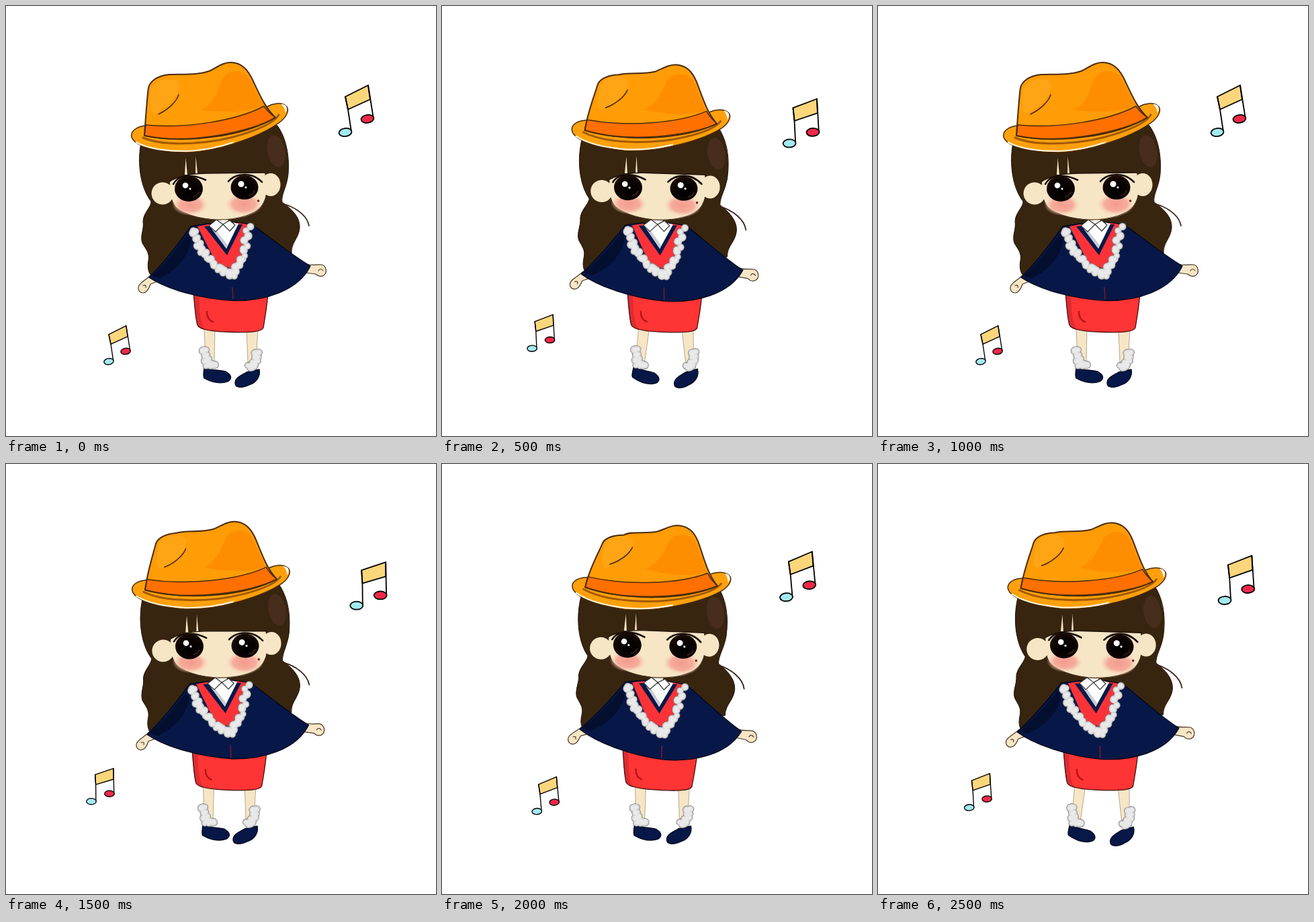
Animation, 640 px wide and 640 px high, one loop 3 s. Source, as an HTML page:

```html
<!DOCTYPE html>
<html lang="en">
<head>
<meta charset="utf-8">
<title>Dancing girl</title>
<style>
  html, body { margin: 0; width: 100%; height: 100%; overflow: hidden; background: #fff; }
  svg { display: block; width: 100vw; height: 100vh; }
</style>
</head>
<body>
<svg viewBox="0 0 640 640" stroke-linecap="round" stroke-linejoin="round">
  <defs>
    <radialGradient id="blush">
      <stop offset="0" stop-color="#f49a8e"/>
      <stop offset=".6" stop-color="#f5a697" stop-opacity=".9"/>
      <stop offset="1" stop-color="#f7d3b5" stop-opacity="0"/>
    </radialGradient>
    <radialGradient id="iris" cx=".55" cy=".6" r=".6">
      <stop offset="0" stop-color="#000"/>
      <stop offset=".65" stop-color="#0a0402"/>
      <stop offset="1" stop-color="#1d0d07"/>
    </radialGradient>
    <g id="note" stroke="#000" stroke-width="1.8">
      <path d="M-16.5-43 17.5-60 20.5-39-12.5-24Z" fill="#fcd67a"/>
      <path d="M-16.5-43-12.5-24-7.5 9M17.5-60 25.5-10" fill="none"/>
      <ellipse cx="-16.5" cy="10" rx="9.5" ry="6" transform="rotate(-8 -16.5 10)" fill="#a3eaf0"/>
      <ellipse cx="16.5" cy="-10" rx="9.5" ry="6" transform="rotate(-8 16.5 -10)" fill="#ee2848"/>
    </g>
  </defs>

  <g id="hair">
    <path fill="#38250f" stroke="#20140a" stroke-width="1" d="M201 203C195 235 200 270 216 291C216 300 204 308 204 321C206 332 199 342 203 353C208 362 214 367 212 379C210 390 212 400 220 404L320 400 425 368C424 352 436 346 437 330C438 314 425 302 411 292C409 281 418 270 420 250C422 225 418 198 404 178L300 160Z"/>
    <ellipse cx="402" cy="216" rx="13" ry="24" transform="rotate(-12 402 216)" fill="#472d1b"/>
    <path d="M411 294C430 299 448 311 451 327" fill="none" stroke="#38221a" stroke-width="1.8"/>
  </g>

  <g id="legL">
    <path d="M295 480 297 530H310L311 480Z" fill="#f6e6c6" stroke="#b9a98b" stroke-width="1"/>
    <path d="M295 538C294 546 293 552 295 554C306 560 319 563 330 559C337 555 336 549 327 544C315 541 305 543 295 538Z" fill="#071848" stroke="#02081c" stroke-width="1.3"/>
    <g id="furL"></g>
  </g>
  <g id="legR">
    <path d="M358 480 360 530H372L375 480Z" fill="#f6e6c6" stroke="#b9a98b" stroke-width="1"/>
    <path d="M377 541C379 550 374 560 362 564C352 569 340 569 341 560C342 552 352 549 358 545Z" fill="#071848" stroke="#02081c" stroke-width="1.3"/>
    <g id="furR"></g>
  </g>

  <g id="skirt">
    <path d="M279 425C281 450 282 465 285 475C288 482 310 485 340 485.500C365 486 380 485 383 479C386 460 389 445 390 425Z" fill="#ff3434"/>
    <path d="M279 425C281 450 282 465 285 475C287 479 291 481 296 482C288 470 288 450 287 425Z" fill="#dc2d31"/>
    <path d="M299 455C299 462 302 468 308 470" fill="none" stroke="#b0181e" stroke-width="2.500"/>
    <path d="M279 425C281 450 282 465 285 475C288 482 310 485 340 485.500C365 486 380 485 383 479C386 460 389 445 390 425" fill="none" stroke="#4a1010" stroke-width="1.3"/>
  </g>

  <g id="body">
    <g fill="#f6e6c6" stroke="#4a3828" stroke-width="1.2">
      <path d="M216 400C209 407 201 411 198 416C195 422 199 427 204 427C210 427 213 420 215 414L230 408Z"/>
      <path d="M447 384C456 387 463 384 470 385C476 387 478 394 475 399C471 404 465 403 461 399L446 397Z"/>
      <path d="M204 416Q209 414 208 419M472 394Q468 389 465 394" fill="none"/>
    </g>
    <path d="M310 312H331L330 324H314Z" fill="#f6e6c6"/>
    <path d="M275 328C258 352 236 381 213 404C240 422 290 436 340 438.500C385 439 435 424 453 387C430 374 395 346 366 325L340 322 300 324Z" fill="#071848" stroke="#02081c" stroke-width="1.4"/>
    <path d="M273 336C257 358 238 382 217 402L229 406C246 396 268 383 275 352Z" fill="#040f30"/>
    <path d="M337 419 338 436" stroke="#7a1c2c" stroke-width="1.5"/>
    <path d="M285 328 300 325 345 323 361 325 354 368 336 391 313 383Z" fill="#fb3338"/>
    <path d="M295 328 329 371 352 325Z" fill="#071848"/>
    <path d="M302 326 328 361 346 324 322 319Z" fill="#fff"/>
    <path d="M303 327 328 361 330 356 315 337Z" fill="#c9ccd4"/>
    <path d="M302 327 313 318 323 325 312 336ZM323 325 333 319 341 326 333 335Z" fill="#fff" stroke="#333" stroke-width="1.2"/>
    <g id="trim"></g>
  </g>

  <g id="face">
    <g fill="#f6e6c6">
      <circle cx="233" cy="279" r="16.500"/>
      <ellipse cx="394" cy="266" rx="14.500" ry="17"/>
      <path d="M244 261C262 250 285 249 300 249L385 248C388 264 389 278 384 291C377 309 355 316 330 317.500C305 319 275 315 257 303C246 294 244 278 244 261Z"/>
      <path d="M266 251 267.500 226 270 251ZM282 250 282.500 224 285 249Z"/>
    </g>
    <path d="M246 290C250 303 275 316 310 318C340 319 378 312 385 289" fill="none" stroke="#4a3322" stroke-width="1.2"/>
    <path d="M244 261C262 250 285 249 300 249L386 248" fill="none" stroke="#1d1108" stroke-width="1.4"/>
    <ellipse cx="274" cy="296" rx="27" ry="16" fill="url(#blush)"/>
    <ellipse cx="354" cy="295" rx="28" ry="17" fill="url(#blush)"/>
    <ellipse cx="272" cy="272" rx="21" ry="19" fill="url(#iris)"/>
    <ellipse cx="355" cy="270" rx="20.500" ry="18" fill="url(#iris)"/>
    <path d="M249 265C254 256 262 253 272 253C283 253 291 256 297 259M331 261C338 253 347 251 356 251C366 251 374 255 381 262" fill="none" stroke="#160c07" stroke-width="2.600"/>
    <g fill="#fff">
      <circle cx="267" cy="267" r="4.300"/><circle cx="274" cy="272" r="1.600"/>
      <circle cx="350" cy="265" r="4.500"/><circle cx="357" cy="270" r="1.600"/>
    </g>
    <path d="M279 284Q285 282 287 277M362 282Q368 280 370 275" fill="none" stroke="#3a1f14" stroke-width="1.800"/>
    <circle cx="375.500" cy="290" r="1.700" fill="#701522"/>
  </g>

  <g id="hat" stroke="#4a2c0c">
    <path d="M207 178C193 180 185 187 187 195C191 209 226 217 268 218C322 216 385 191 410 171C420 162 422 152 416 148C409 143 397 145 388 150Z" fill="#ffa00c" stroke-width="1.500"/>
    <path d="M194 203C211 212 240 216 268 216C295 215 318 210 338 203" fill="none" stroke="#fff3d6" stroke-width="2.200"/>
    <path d="M409 146C418 146 420 152 416 159C415 153 413 149 409 146Z" fill="#fff" stroke="none"/>
    <path d="M204 196C240 211 310 205 355 190C380 182 400 172 406 162" fill="none" stroke="#a35a06" stroke-width="3"/>
    <path class="crown" fill="#ff9c06" stroke="none"/>
    <path d="M291 155C310 145 316 125 322 108C330 96 350 92 360 105C368 120 376 136 383 148C355 160 320 158 291 155Z" fill="#ff8d00" stroke="none"/>
    <path id="sheen" d="M216 125C222 110 238 106 256 112C262 122 250 145 222 160C214 162 213 145 216 125Z" fill="#ffa515" stroke="none"/>
    <path d="M208 177C270 183 345 170 384 149C388 155 394 161 401 166C355 194 270 206 206 193Z" fill="#ff7000" stroke-width="1.500"/>
    <path class="crown" fill="none" stroke-width="2"/>
    <path id="crease" d="M257 132C254 142 242 154 227 161" fill="none" stroke-width="1.600"/>
  </g>

  <use id="noteBig" href="#note"/>
  <use id="noteSmall" href="#note"/>
</svg>
<script>
const BEAT = 500;
const $ = id => document.getElementById(id);

// Fluffy fur: small overlapping circles scattered along a polyline
function fur(id, points, count, radius) {
  const dots = [];
  for (let i = 0; i < count; i++) {
    const p = i / (count - 1) * (points.length - 1);
    const k = Math.min(Math.floor(p), points.length - 2), f = p - k;
    const [a, b] = [points[k], points[k + 1]];
    const x = a[0] + (b[0] - a[0]) * f + 3 * Math.sin(i * 2.4);
    const y = a[1] + (b[1] - a[1]) * f + 2 * Math.cos(i * 1.9);
    dots.push([x, y, radius * (1 + 0.15 * Math.sin(i * 3.7))]);
  }
  const layer = (grow, fill) => dots.map(([x, y, r]) =>
    `<circle cx="${x}" cy="${y}" r="${r + grow}" fill="${fill}"/>`).join('');
  $(id).innerHTML = layer(0.7, '#77777c') + layer(0, '#d6d6d6') + layer(-1.8, '#e9e9e9');
}
fur('trim', [[279, 333], [290, 362], [312, 388], [337, 401], [352, 376], [361, 330]], 46, 5.2);
fur('furL', [[295, 510], [298, 523], [301, 535], [309, 533]], 17, 5);
fur('furR', [[375, 514], [372, 526], [367, 537], [362, 537]], 17, 5);

// The left side of the crown slides inwards by k
const crown = k => `M206 193C208 165 ${210 + k} 135 ${212 + k} ${122 + 0.3 * k}`
  + `C${214 + k} ${112 + 0.5 * k} ${225 + k} ${104 + 0.6 * k} ${242 + k} ${102 + 0.6 * k}`
  + 'C262 101 285 103 302 97C313 92 322 84 334 84C350 84 360 94 368 112'
  + 'C378 133 386 152 401 166C365 188 270 207 206 193';

const pivots = {
  hat: [303, 172], face: [312.5, 271], hair: [312.5, 271], body: [320, 322],
  skirt: [335, 432], legL: [303, 480], legR: [366, 480]
};

// Each part: turn in degrees, shift x, shift y
const rest = { crown: 0 };
const sway = {
  crown: 7,
  hat: [5, 8, 0.5], face: [2.5, 5, 0], hair: [2.6, 4, 0], body: [2.7, -2, 0],
  skirt: [0.4, -3, 0], legL: [7, -2.5, 0], legR: [-4, -1, 0]
};
const nod = {
  crown: 6,
  hat: [3.2, 2, 0], face: [0.7, 1, 0], hair: [0.7, 1, 0], body: [0.7, -1.8, 0],
  skirt: [0.3, -2, 0], legL: [0.5, -1.5, -1], legR: [0, -3, -2]
};
const lean = {
  crown: 11,
  hat: [7.3, 9, 3], face: [3, 3.8, -0.5], hair: [3.2, 2, 0], body: [4.8, -1.5, 0],
  skirt: [1.3, -10, 0], legL: [1, -7.5, -1], legR: [0, -6.5, -2]
};
const poses = [rest, sway, rest, nod, lean, sway];
const swings = [0, 5.8, 0, 8, 3.6, 5.3];

const place = (id, transform) => $(id).setAttribute('transform', transform);

function draw(time) {
  const beat = Math.floor(time / BEAT) % poses.length;
  const pose = poses[beat], s = swings[beat], k = pose.crown;
  for (const id in pivots) {
    const [turn, dx, dy] = pose[id] || [0, 0, 0];
    place(id, `translate(${dx} ${dy}) rotate(${turn} ${pivots[id]})`);
  }
  document.querySelectorAll('.crown').forEach(path => path.setAttribute('d', crown(k)));
  place('sheen', `translate(${k} 0)`);
  place('crease', `translate(${k} ${-0.6 * k})`);
  place('noteBig', `translate(${521.5 + 2.25 * s} ${178 + 3.13 * s}) rotate(${s})`);
  place('noteSmall', `translate(${165.5 - 3.13 * s} ${521.5 - 3.13 * s}) rotate(${s}) scale(.76)`);
}

let start;
function tick(now) {
  start ??= now;
  draw(now - start);
  requestAnimationFrame(tick);
}
draw(0);
requestAnimationFrame(tick);
</script>
</body>
</html>
```
